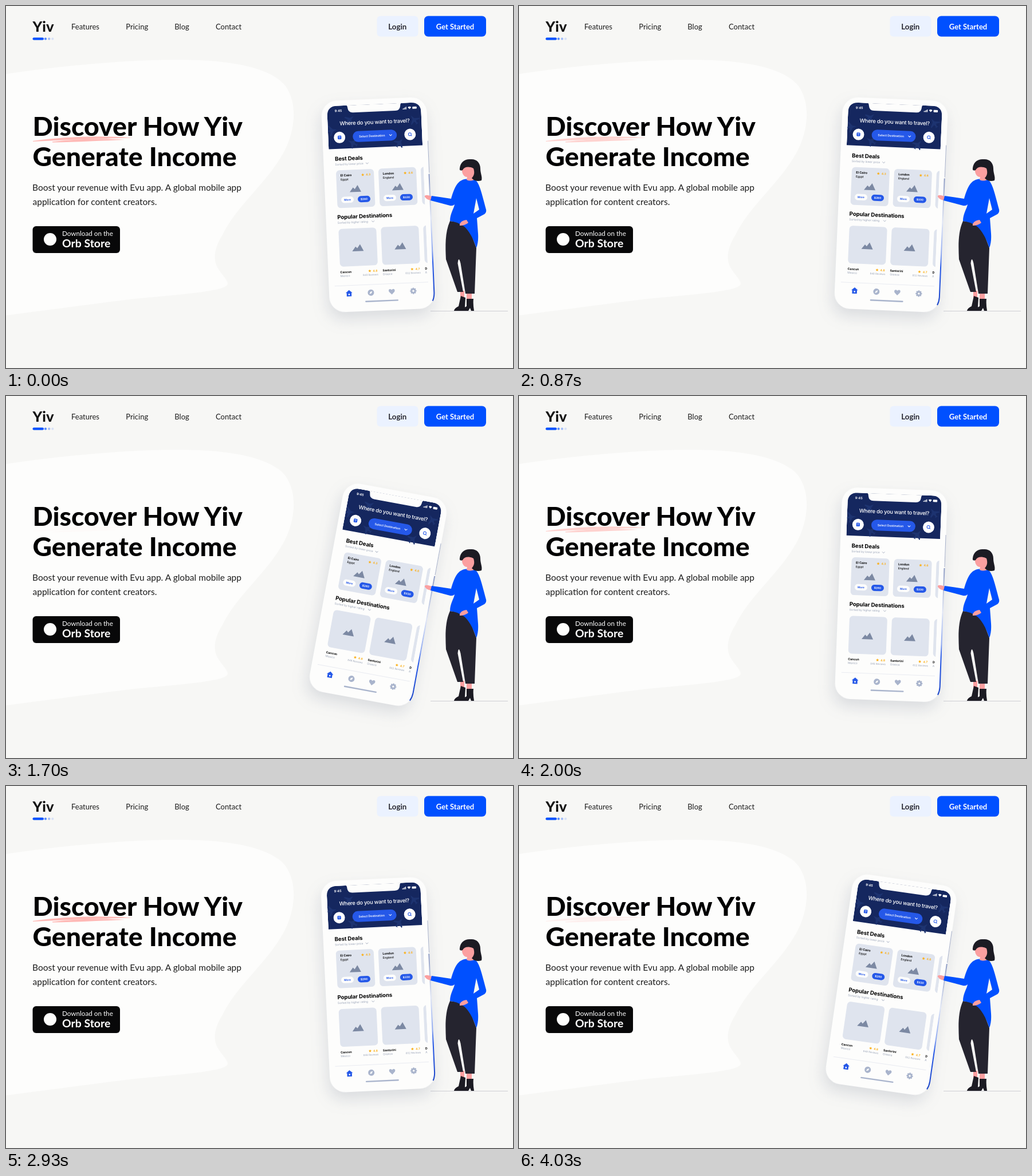
These frames come from a looping animation (885x633 px, 4.06 s). An HTML page:

```html
<!DOCTYPE html>
<html lang="en">
<head>
<meta charset="utf-8">
<title>Landing page</title>
<style>
html, body { margin: 0; width: 100%; height: 100%; overflow: hidden; background: #f7f7f5; }
svg { display: block; font-family: Lato, sans-serif; }
#phone { font-family: Inter, sans-serif; }
.blue { fill: #0050ff; }
.app { fill: #2558e8; }
.skin { fill: #fb9fa0; }
.dark { fill: #1c1b23; }
.pants { fill: #25242f; }
.grey { fill: #a9b4cc; }
.tile { fill: #dfe4ee; }
.white { fill: #fdfdfc; }
.bold { font-weight: 700; }
.body { fill: none; filter: drop-shadow(-3px 13px 13px rgba(80, 90, 120, .17)); }
.mid { text-anchor: middle; }
.end { text-anchor: end; }
</style>
</head>
<body>
<svg width="885" height="633" viewBox="0 0 885 633">
  <defs>
    <linearGradient id="edge" x1="0" y1="-50" x2="0" y2="172" gradientUnits="userSpaceOnUse">
      <stop offset="0" stop-color="#8e9cc4"/>
      <stop offset=".35" stop-color="#dfe5f5"/>
      <stop offset=".6" stop-color="#8fa9f0"/>
      <stop offset=".7" stop-color="#2558e8"/>
      <stop offset="1" stop-color="#1c46c8"/>
    </linearGradient>
    <clipPath id="view"><path d="M-82 -158Q-82 -176 -64 -176H64Q82 -176 82 -158V180H-82Z"/></clipPath>
    <path id="hills" d="M-10 6L-4 -2 -1 1 4 -6 10 6Z" fill="#7c89a3"/>
    <path id="plane" d="M0 -9L2 -2 9 3V5L2 3 1 7 3 9H-3L-1 7 -2 3 -9 5V3L-2 -2Z" fill="#1d3370"/>
    <path id="star" d="M0 -2.6L.8 -.9 2.6 -.8 1.2 .5 1.6 2.3 0 1.3 -1.6 2.3 -1.2 .5 -2.6 -.8 -.8 -.9Z" fill="#fbb01a"/>
    <path id="arrow" d="M-2 -1L0 1 2 -1" fill="none" stroke-linecap="round"/>
  </defs>

  <path class="white" d="M0 119C100 104 205 95 290 94C400 93 465 110 488 140C512 175 502 225 484 257C455 310 402 350 378 400C362 425 362 445 369 457C378 473 392 483 385 489C372 502 250 508 200 515C130 524 60 533 0 541Z"/>

  <!-- header -->
  <text x="46.5" y="45" font-size="25.5" font-weight="800" fill="#111">Yiv</text>
  <g class="blue">
    <rect x="46.5" y="55.3" width="19.5" height="4.2" rx="2.1"/>
    <circle cx="69" cy="57.4" r="2.1" opacity=".65"/>
    <circle cx="75.2" cy="57.4" r="2.1" opacity=".35"/>
    <circle cx="81.3" cy="57.4" r="2.1" opacity=".13"/>
  </g>
  <g font-size="13" fill="#1c1c1c">
    <text x="114" y="41">Features</text>
    <text x="209.3" y="41">Pricing</text>
    <text x="294.3" y="41">Blog</text>
    <text x="366" y="41">Contact</text>
  </g>
  <rect x="647.5" y="17.5" width="72" height="36" rx="6" fill="#ebf2ff"/>
  <text class="bold mid" x="683.3" y="41" font-size="13.3" fill="#26262e">Login</text>
  <rect class="blue" x="730" y="17.5" width="108" height="36" rx="7"/>
  <text class="bold mid" x="784" y="41" font-size="13" fill="#fff">Get Started</text>

  <!-- hero copy -->
  <g id="swash" fill="#ffaaa6">
    <path d="M47 236C95 229 160 226 222 230.5C165 232 105 234 47 237Z"/>
    <path d="M81 237.3C120 232.5 170 231 207 234C170 235.3 125 238 81 238.5Z"/>
  </g>
  <g font-size="46.4" font-weight="800">
    <text x="46.5" y="227">Discover How Yiv</text>
    <text x="46.5" y="280">Generate Income</text>
  </g>
  <g font-size="15.5" fill="#1c1c1c">
    <text x="46" y="322.5">Boost your revenue with Evu app. A global mobile app</text>
    <text x="46.5" y="347.5">application for content creators.</text>
  </g>
  <rect x="46.5" y="385" width="152.5" height="47" rx="6" fill="#080809"/>
  <circle class="white" cx="77" cy="408" r="11"/>
  <text x="98" y="402" font-size="11.7" fill="#fff">Download on the</text>
  <text class="bold" x="98" y="422.3" font-size="19.4" fill="#fff">Orb Store</text>

  <path d="M741 533.5H876" stroke="#cfcfd4"/>
  <g id="phone"></g>

  <!-- woman -->
  <path class="skin" d="M793 498H800V510H793ZM804 500H813V514H804Z"/>
  <path class="dark" d="M794 507L802 510 801 526 804 533H782Q783 528 790 525ZM804 512H816Q815 521 817 533H812L810 528 807 533H797Q798 528 804 525Z"/>
  <path class="pants" d="M775 376C766 396 767 420 768 443L788 500 798 500 788.5 450Q790 436 793.5 450L802 503H818L821 423 805 380Z"/>
  <path class="skin" d="M744 333L737 331Q730 330 731 333.5 734 339 743 340Z"/>
  <path class="blue" fill-rule="evenodd" d="M797 304C802 302 815 302 820 305C826 310 830 325 838 356Q839 361 835 364L822 371 824 398Q825 413 821 423C816 407 808 392 799 385C792 380 784 377 775 376C775 363 782 354 783 347Q780 350 775 349L741 340 743 332 777 337C781 323 786 308 797 304ZM821 336L816 363 826 356Z"/>
  <path class="skin" d="M792 381Q795 375 804 374L807 379Q801 384 792 384Z"/>
  <path class="skin" d="M796 283C800 277 814 277 818 284L817 304Q810 307 804 304L805 299C798 299 795 291 796 283Z"/>
  <path class="dark" d="M792 284C793 272 802 267 811 268C821 267 828 274 828 284C828 293 832 299 830 305C824 307 817 306 813 301C818 296 818 290 816 284C808 280 800 281 797 287Q791 289 792 284Z"/>
</svg>
<script>
const phone = document.getElementById('phone');
const swash = document.getElementById('swash');

const text = (x, y, size, str, attrs = '') => `<text x="${x}" y="${y}" font-size="${size}" ${attrs}>${str}</text>`;
const pill = (x, y, w, h, cls, r = h / 2) =>
  `<rect class="${cls}" x="${x - w / 2}" y="${y - h / 2}" width="${w}" height="${h}" rx="${r}"/>`;
const put = (id, x, y, attrs = '') => `<use href="#${id}" transform="translate(${x} ${y}) ${attrs}"/>`;
const tile = (x, y) => pill(x + 33, y + 33, 66, 66, 'tile', 6);
const muted = 'fill="#98a2b6"';
const gold = 'class="bold end" fill="#fbb01a"';

function heading(y, title, note, arrowX) {
  return text(-72, y, 9.6, title, 'font-weight="650" letter-spacing="-.08"') +
    text(-72, y + 8.2, 4.9, note, muted) +
    `<g stroke="#98a2b6" stroke-width=".8">${put('arrow', arrowX, y + 6.6)}</g>`;
}

function deal(x, city, land, rating, price) {
  return tile(x, -63) + text(x + 7.5, -52, 5.3, city, 'class="bold"') +
    text(x + 7.5, -45, 4.9, land, 'font-weight="500"') +
    put('star', x + 46.5, -53.5) + text(x + 60, -51.8, 5, rating, gold) +
    put('hills', x + 32.5, -30) +
    pill(x + 18, -11, 22, 11, 'white') + text(x + 18, -9.3, 4.7, 'More', 'class="bold mid app"') +
    pill(x + 47, -11, 22, 11, 'app') + text(x + 47, -9.3, 4.7, price, 'class="bold mid" fill="#fff"');
}

function place(x, city, land, rating, reviews) {
  return tile(x, 39.5) + put('hills', x + 32.5, 73.5) +
    text(x, 117, 5.2, city, 'class="bold"') + text(x, 123.5, 4.9, land, muted) +
    put('star', x + 51.5, 115) + text(x + 65, 117, 5, rating, gold) +
    text(x + 66, 123.3, 4.4, reviews + ' Reviews', `class="end" ${muted}`);
}

const teeth = [0, 45, 90, 135].map(a => `<rect x="-1.3" y="-5.6" width="2.6" height="11.2" rx=".6" transform="rotate(${a})"/>`).join('');

phone.innerHTML = `
  <g class="body">${pill(0, 0, 184, 370, 'white', 27)}</g>
  <path d="M91.6 -108V-52" stroke="#a7b0c9" stroke-width="1"/>
  <path d="M91.2 -50V158Q91 166 88 172" fill="none" stroke="url(#edge)" stroke-width="2"/>
  <g clip-path="url(#view)">
    <rect x="-82" y="-176" width="164" height="75.3" fill="#15275f"/>
    ${put('plane', -43, -151, 'rotate(50)')}${put('plane', 69, -146, 'rotate(-35)')}
    ${put('plane', -75, -133, 'rotate(80)')}${put('plane', 42, -107, 'rotate(40)')}${put('plane', -40, -110, 'rotate(-60)')}
    <path class="white" d="M-50 -177Q-46 -176 -46 -171 -45 -163 -37 -163H37Q45 -163 46 -171 46 -176 50 -177Z"/>
    <g fill="#fff">
      ${text(-62.5, -165, 5.6, '9:45', 'class="mid bold"')}
      ${[0, 1, 2, 3].map(i => `<rect x="${50 + i * 1.8}" y="${-166 - i}" width="1.2" height="${1.5 + i}"/>`).join('')}
      <path d="M59 -168Q62 -170.5 65 -168L62 -164.7Z"/>
      <rect x="67" y="-168.8" width="7.5" height="3.9" rx="1"/>
      ${text(0, -141.5, 9.4, 'Where do you want to travel?', 'class="mid" font-weight="500" letter-spacing="-.3"')}
      ${pill(-.6, -120.7, 77, 19, 'app')}
      ${text(-5.5, -118.8, 5.2, 'Select Destination', 'class="mid" font-weight="600"')}
      <circle cx="-62.2" cy="-120.4" r="10"/><circle cx="61" cy="-120.4" r="10"/>
    </g>
    <g stroke="#fff" stroke-width="1">${put('arrow', 27, -120.7)}</g>
    ${pill(-62.2, -120.4, 6.4, 6.4, 'app', 1.5)}
    <path d="M-64.5 -121.5H-60M-62.2 -123V-118" stroke="#cbd8ff" stroke-width=".6"/>
    <path d="M62.5 -119L64 -117.4" stroke="#2558e8"/>
    <circle cx="60.6" cy="-120.8" r="2.5" fill="none" stroke="#2558e8"/>
    ${heading(-79.8, 'Best Deals', 'Sorted by lower price', -16)}
    ${deal(-71, 'El Cairo', 'Egypt', '4.3', '$260')}
    ${deal(3, 'London', 'England', '4.6', '$330')}
    ${tile(77, -63)}
    ${heading(22.2, 'Popular Destinations', 'Sorted by higher rating', -10)}
    ${place(-71, 'Cancun', 'Mexico', '4.8', '848')}
    ${place(3, 'Santorini', 'Greece', '4.7', '602')}
    ${tile(77, 39.5)}${text(77, 117, 5.2, 'D', 'class="bold"')}${text(77, 123.5, 4.9, 'A', muted)}
    <path d="M-82 139H82" stroke="#e9ebf1"/>
  </g>
  <path class="app" d="M-57.2 147L-51.3 152H-53V158H-61.4V152H-63Z"/>
  <circle class="white" cx="-57.2" cy="154.5" r="1.4"/>
  <circle class="grey" cx="-19.1" cy="153" r="5.5"/>
  <path class="white" d="M-16.6 150.5L-18 154.2 -21.6 155.5 -20.2 151.8Z"/>
  <path class="grey" d="M17.4 158L12.6 153Q11 149 14.4 148.3 16.6 148.3 17.4 150 18.2 148.3 20.4 148.3 23.8 149 22.2 153Z"/>
  <g class="grey" transform="translate(55 153.2)">${teeth}<circle r="4.4"/><circle class="white" r="1.7"/></g>
  ${pill(-.6, 168.2, 58, 2.4, 'grey')}`;

// cubic-bezier(.25, .1, .25, 1)
function ease(x) {
  const curve = (a, b, s) => 3 * a * s * (1 - s) ** 2 + 3 * b * s * s * (1 - s) + s ** 3;
  let lo = 0, hi = 1;
  for (let i = 0; i < 24; i++) {
    const s = (lo + hi) / 2;
    if (curve(.25, .25, s) < x) lo = s; else hi = s;
  }
  return curve(.1, 1, lo);
}

const LOOP = 4060, HALF = 1110, START = 550, LOW = -5.6, HIGH = 10.8;

function draw(now) {
  const turn = ((now % LOOP - START) / HALF + 2) % 2;
  const swing = turn < 1 ? ease(turn) : 1 - ease(turn - 1);
  phone.setAttribute('transform', `translate(649.5 347.5) rotate(${LOW + (HIGH - LOW) * swing})`);
  swash.setAttribute('opacity', 1 - swing);
}

const begin = performance.now();
function tick() {
  draw(performance.now() - begin);
  requestAnimationFrame(tick);
}
tick();
</script>
</body>
</html>
```
